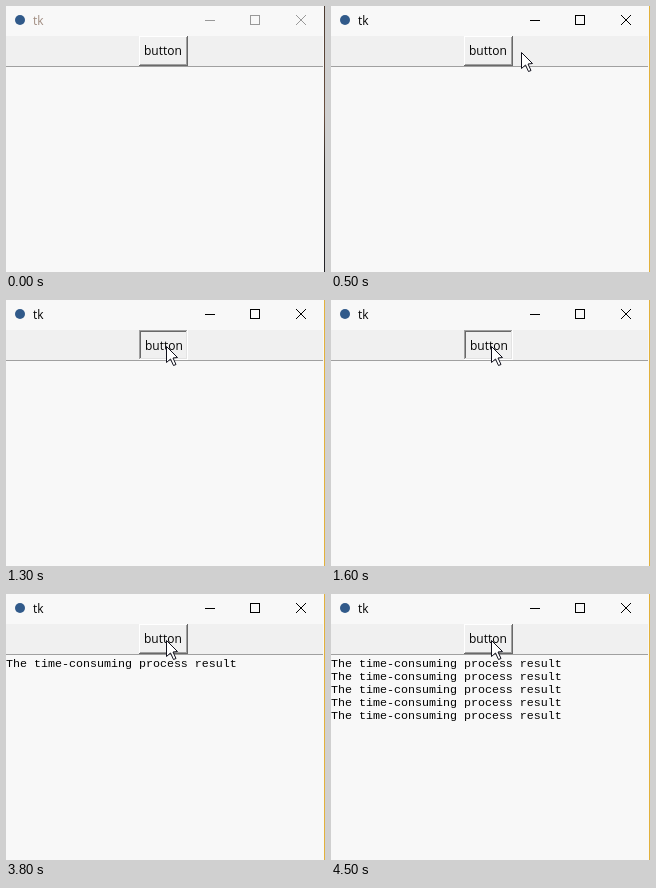
Animation of 319x266 px, one loop 8 s. Source, as an HTML page with a canvas:

```html
<!DOCTYPE html>
<html>
<head>
<meta charset="utf-8">
<style>
html, body { margin: 0; width: 100%; height: 100%; overflow: hidden; background: #f8f8f8; }
canvas { display: block; }
</style>
</head>
<body>
<canvas id="stage" width="319" height="266"></canvas>
<script>
const LOOP = 8000;
const ctx = document.getElementById('stage').getContext('2d');
const presses = [1000, 1300, 1600];
const lineTimes = [3800, 4000, 4100, 4300, 4500];
// pointer tip at each 100 ms step, starting at 100 ms
const path = [[296, 142], [262, 100], [234, 70], [208, 52], [190, 46], [172, 46], [160, 46]];

function rect(color, x, y, w, h) {
  ctx.fillStyle = color;
  ctx.fillRect(x, y, w, h);
}

function text(str, x, y, font, color) {
  ctx.font = font;
  ctx.fillStyle = color;
  ctx.fillText(str, x, y);
}

function titleBar(active) {
  const ink = active ? '#000' : '#999';
  ctx.fillStyle = '#315a8a';
  ctx.beginPath();
  ctx.arc(14, 14, 5, 0, Math.PI * 2);
  ctx.fill();
  text('tk', 27, 19, '12px "Open Sans", "Noto Sans", sans-serif', active ? '#000' : '#a08c80');
  rect(ink, 199, 14, 10, 1);
  ctx.strokeStyle = ink;
  ctx.lineWidth = 1;
  ctx.strokeRect(244.5, 9.5, 9, 9);
  ctx.beginPath();
  ctx.moveTo(290, 9);
  ctx.lineTo(300, 19);
  ctx.moveTo(300, 9);
  ctx.lineTo(290, 19);
  ctx.stroke();
}

function edge(active) {
  if (active) return rect('#e2b13c', 318, 0, 1, 266);
  const g = ctx.createLinearGradient(0, 0, 0, 266);
  g.addColorStop(0, '#4a3a30');
  g.addColorStop(0.4, '#6a5040');
  g.addColorStop(0.6, '#2c2826');
  g.addColorStop(1, '#242428');
  rect(g, 318, 0, 1, 266);
}

function button(down) {
  const [x, y, w, h] = [133, 30, 49, 30];
  const outer = down ? ['#a0a0a0', '#fff'] : ['#fff', '#696969'];
  const inner = down ? ['#696969', '#e3e3e3'] : ['#f0f0f0', '#a0a0a0'];
  rect(outer[1], x, y, w, h);
  rect(outer[0], x, y, w - 1, h - 1);
  rect(inner[1], x + 1, y + 1, w - 2, h - 2);
  rect(inner[0], x + 1, y + 1, w - 3, h - 3);
  rect('#f0f0f0', x + 2, y + 2, w - 4, h - 4);
  const shift = down ? 1 : 0;
  text('button', 138 + shift, 49 + shift, '12px "Open Sans", "Noto Sans", sans-serif', '#000');
}

function pointer(x, y) {
  const shape = [[0, 0], [0, 16], [4, 12.5], [7, 19], [9.5, 18], [6.5, 11.5], [11, 11]];
  ctx.beginPath();
  for (const [dx, dy] of shape) ctx.lineTo(x + dx + 0.5, y + dy + 0.5);
  ctx.closePath();
  ctx.fillStyle = '#fff';
  ctx.fill();
  ctx.strokeStyle = '#10101c';
  ctx.lineWidth = 1;
  ctx.stroke();
}

function draw(t) {
  const active = t >= 100;
  rect('#f8f8f8', 0, 0, 319, 266);
  rect('#f0f0f0', 0, 30, 317, 30);
  rect('#a0a0a0', 0, 60, 317, 1);
  titleBar(active);
  edge(active);
  button(presses.some(p => t >= p && t < p + 100));
  lineTimes.forEach((start, i) => {
    if (t >= start) {
      text('The time-consuming process result', 0, 73 + 13 * i,
        '11.667px "Liberation Mono", "Courier New", monospace', '#000');
    }
  });
  if (active) pointer(...path[Math.min(Math.floor(t / 100) - 1, path.length - 1)]);
}

function tick() {
  draw(performance.now() % LOOP);
  requestAnimationFrame(tick);
}
tick();
</script>
</body>
</html>
```
